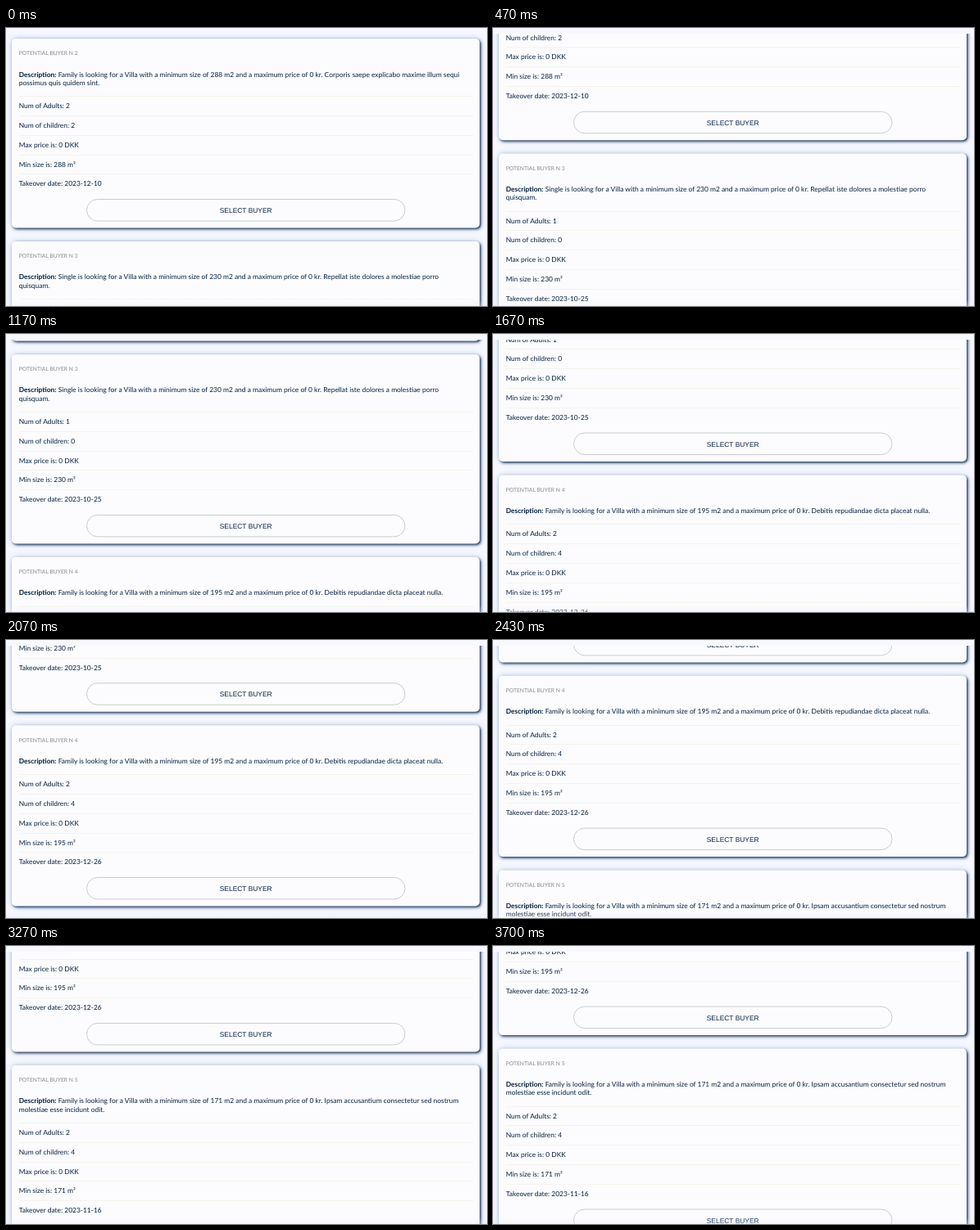
These frames come from a looping animation (587x340 px, 3730 ms). An HTML page with a canvas:

```html
<!DOCTYPE html>
<html lang="en">
<head>
<meta charset="utf-8">
<title>Potential buyers</title>
<style>
  html, body { margin: 0; width: 100%; height: 100%; overflow: hidden; background: #f6f8fd; }
  canvas { display: block; width: 587px; height: 340px; }
</style>
</head>
<body>
<canvas id="stage" width="587" height="340"></canvas>
<script>
const W = 587, H = 340, LOOP = 3730, FRAME = 100 / 3;
const ctx = document.getElementById('stage').getContext('2d');
ctx.textRendering = 'geometricPrecision';
const INK = '#06203f';
const LINE = 10.2, ROW = 23.85, GAP = 16.4, CLIP_TOP = 7;
const BODY = '8.44px Lato, sans-serif';

const buyers = [
  { n: 2, kind: 'Family', size: 288, adults: 2, children: 2, date: '2023-12-10',
    note: ['Corporis saepe explicabo maxime illum sequi', 'possimus quis quidem sint.'] },
  { n: 3, kind: 'Single', size: 230, adults: 1, children: 0, date: '2023-10-25',
    note: ['Repellat iste dolores a molestiae porro', 'quisquam.'] },
  { n: 4, kind: 'Family', size: 195, adults: 2, children: 4, date: '2023-12-26',
    note: ['Debitis repudiandae dicta placeat nulla.'] },
  { n: 5, kind: 'Family', size: 171, adults: 2, children: 4, date: '2023-11-16',
    note: ['Ipsam accusantium consectetur sed nostrum', 'molestiae esse incidunt odit.'] }
];

// time in ms, scroll offset in px, speed in px/ms
const path = [
  [0, 0, .25], [470, 107.3, .205], [1170, 236, .19], [1670, 336.4, .185],
  [2430, 465, .178], [2870, 547.4, .172], [3700, 621, 0]
];

function scrollAt(t) {
  let i = 0;
  while (i < path.length - 2 && t >= path[i + 1][0]) i++;
  const [t0, y0, v0] = path[i], [t1, y1, v1] = path[i + 1];
  const d = t1 - t0, u = Math.min(1, (t - t0) / d), w = 1 - u;
  return w * w * ((1 + 2 * u) * y0 + u * d * v0) + u * u * ((1 + 2 * w) * y1 - w * d * v1);
}

function roundRect(x, y, w, h, r) {
  ctx.beginPath();
  ctx.roundRect(x, y, w, h, r);
}

function text(str, x, y, font = BODY, color = INK) {
  ctx.font = font;
  ctx.fillStyle = color;
  ctx.fillText(str, x, y);
}

function shadowFill(color, blur, offset) {
  ctx.shadowColor = color;
  ctx.shadowBlur = blur;
  ctx.shadowOffsetX = ctx.shadowOffsetY = offset;
  ctx.fill();
}

function panel(y, h) {
  ctx.save();
  ctx.fillStyle = '#fcfcff';
  roundRect(7, y, 571, h, 5);
  shadowFill('rgba(90, 130, 200, .3)', 9, 0);
  shadowFill('rgb(14, 42, 82)', 3.2, 1.5);
  ctx.restore();
}

function button(y) {
  ctx.strokeStyle = '#b9c0be';
  ctx.lineWidth = .8;
  roundRect(98.5, y, 388.5, 26.5, 13.25);
  ctx.stroke();
  ctx.textAlign = 'center';
  text('SELECT BUYER', 292.7, y + 16.6, '8.44px "Liberation Sans", Arial, sans-serif');
  ctx.textAlign = 'left';
}

function card(b, y, h) {
  const x = 15.7, extra = (b.note.length - 2) * LINE;
  panel(y, h);
  text('POTENTIAL BUYER N ' + b.n, x, y + 20.4, '6.75px Lato, sans-serif', '#888884');
  text('Description:', x, y + 46.5, 'bold ' + BODY);
  const indent = ctx.measureText('Description:').width;
  text(` ${b.kind} is looking for a Villa with a minimum size of ${b.size} m2` +
    ` and a maximum price of 0 kr. ${b.note[0]}`, x + indent, y + 46.5);
  if (b.note[1]) text(b.note[1], x, y + 46.5 + LINE);

  const rows = [
    'Num of Adults: ' + b.adults, 'Num of children: ' + b.children,
    'Max price is: 0 DKK', `Min size is: ${b.size} m²`, 'Takeover date: ' + b.date
  ];
  rows.forEach((row, i) => {
    const top = y + 70 + extra + i * ROW;
    ctx.fillStyle = '#f4f4ea';
    ctx.fillRect(x, Math.round(top), 555, 1);
    text(row, x, top + 15);
  });
  button(y + 196.5 + extra);
}

function draw(t) {
  ctx.fillStyle = '#f6f8fd';
  ctx.fillRect(0, 0, W, H);
  ctx.save();
  ctx.beginPath();
  ctx.rect(0, CLIP_TOP, W, H - CLIP_TOP);
  ctx.clip();
  let y = 13 - scrollAt(t);
  for (const b of buyers) {
    const h = 231.5 + (b.note.length - 2) * LINE;
    if (y < H && y + h + 6 > 0) card(b, y, h);
    y += h + GAP;
  }
  const fade = ctx.createLinearGradient(0, 332, 0, H);
  fade.addColorStop(0, 'rgba(232, 234, 246, 0)');
  fade.addColorStop(1, 'rgba(232, 234, 246, .35)');
  ctx.fillStyle = fade;
  ctx.fillRect(0, 332, W, 8);
  ctx.restore();
}

const start = performance.now();
function tick() {
  const t = (performance.now() - start) % LOOP;
  const step = Math.floor((Math.floor(t / 10) * 10 + 5) / FRAME);
  draw(Math.round(step * FRAME / 10) * 10);
  requestAnimationFrame(tick);
}
tick();
</script>
</body>
</html>
```
